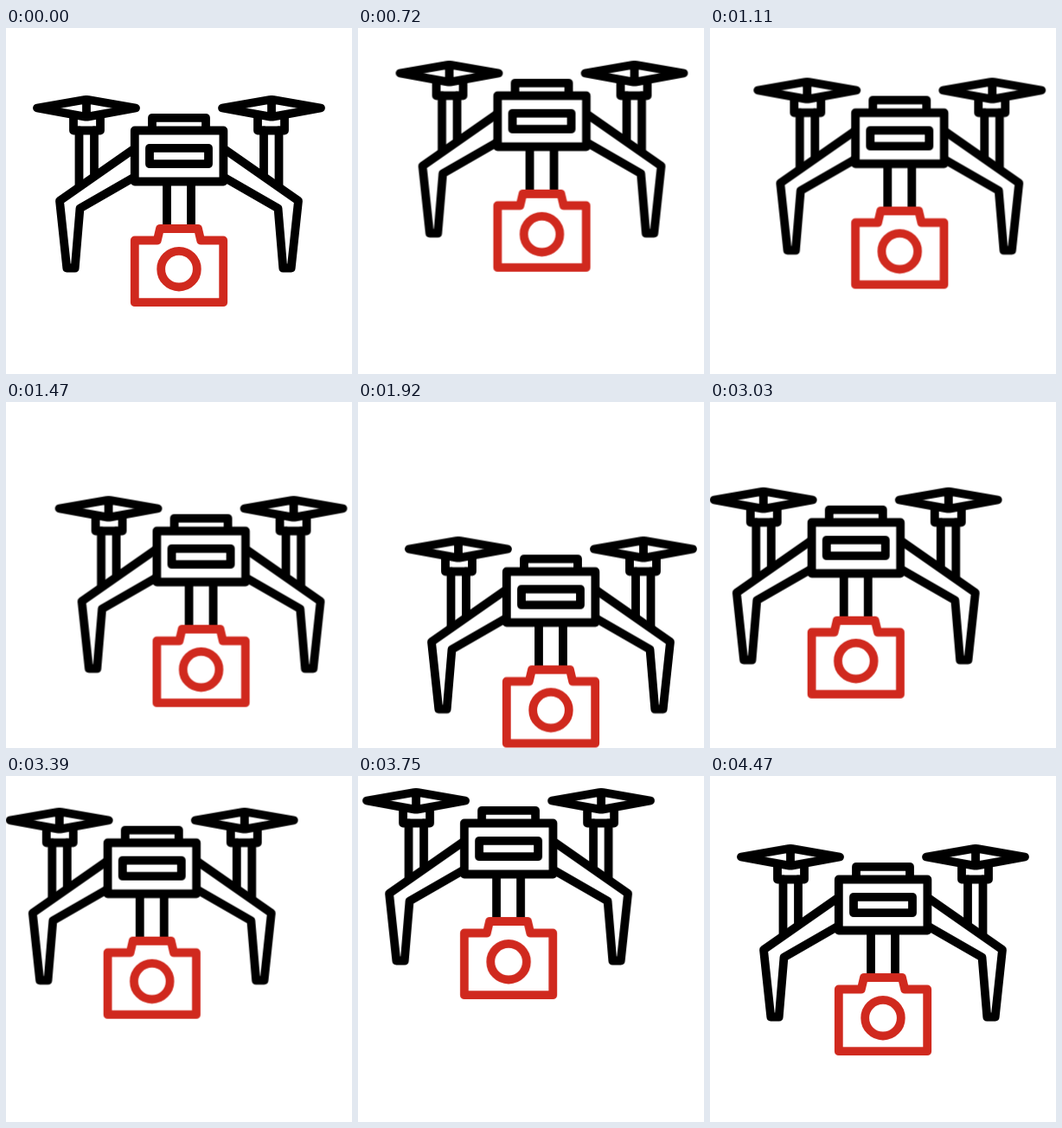
Animation, 400 px wide and 400 px high, one loop 4500 ms. Source, as an HTML page:

```html
<!DOCTYPE html>
<html lang="en">
<head>
<meta charset="utf-8">
<title>Camera drone</title>
<style>
  html, body { margin: 0; width: 100%; height: 100%; overflow: hidden; background: #fff; }
  svg { display: block; width: 100vw; height: 100vh; }
  #drone { fill: none; stroke: #000; stroke-width: 9.8; stroke-linejoin: round; stroke-linecap: round; }
  .camera { stroke: #d0291e; }
</style>
</head>
<body>
<svg viewBox="0 0 400 400">
  <defs>
    <g id="wing">
      <path d="M36 92.5 L90.5 83 Q93 82.6 95.5 83 L150 92.5 L95.5 102.4 Q93 102.9 90.5 102.4 Z M93 83 V102"/>
      <path d="M78 103.5 V118.5 H109 V103.5"/>
      <path d="M84.5 118.5 V183 M102 118.5 V171"/>
      <path d="M149 139 L62 199.7 L70.3 277.5 H79.7 L85.5 208.4 L149 172"/>
    </g>
  </defs>
  <g id="drone">
    <use href="#wing"/>
    <use href="#wing" transform="matrix(-1 0 0 1 400 0)"/>
    <path d="M169 118 V103.8 H231 V118"/>
    <path d="M186 178 V230 M214 178 V230"/>
    <rect x="148.8" y="118.5" width="102.6" height="59" fill="#fff"/>
    <rect x="166" y="138.8" width="68" height="18.4"/>
    <g class="camera">
      <path d="M148.8 245.5 H174.8 L178 232 H222 L225.2 245.5 H251.2 V317.2 H148.8 Z"/>
      <circle cx="200" cy="278.7" r="20.8"/>
    </g>
  </g>
</svg>
<script>
  const LOOP = 4500, TICK = 30, BEAT = 900;
  const REACH_X = 31.3, REACH_Y = 77.5;

  // Flight plan, one stop per beat, in units of the reach
  const stops = [[0, 0], [0.5, -0.65], [1, 1], [-1, 1], [-1, -1], [0, 0.013]];

  // The last stop is reached one tick before the loop restarts
  const timeOf = i => Math.min(i * BEAT, LOOP - TICK);

  const frames = stops.map(([x, y], i) => ({
    offset: timeOf(i) / LOOP,
    transform: `translate(${x * REACH_X}px, ${y * REACH_Y}px)`,
    easing: `steps(${Math.max(1, (timeOf(i + 1) - timeOf(i)) / TICK)}, end)`
  }));
  frames.push({ ...frames.at(-1), offset: 1 });

  document.getElementById("drone").animate(frames, { duration: LOOP, iterations: Infinity });
</script>
</body>
</html>
```
